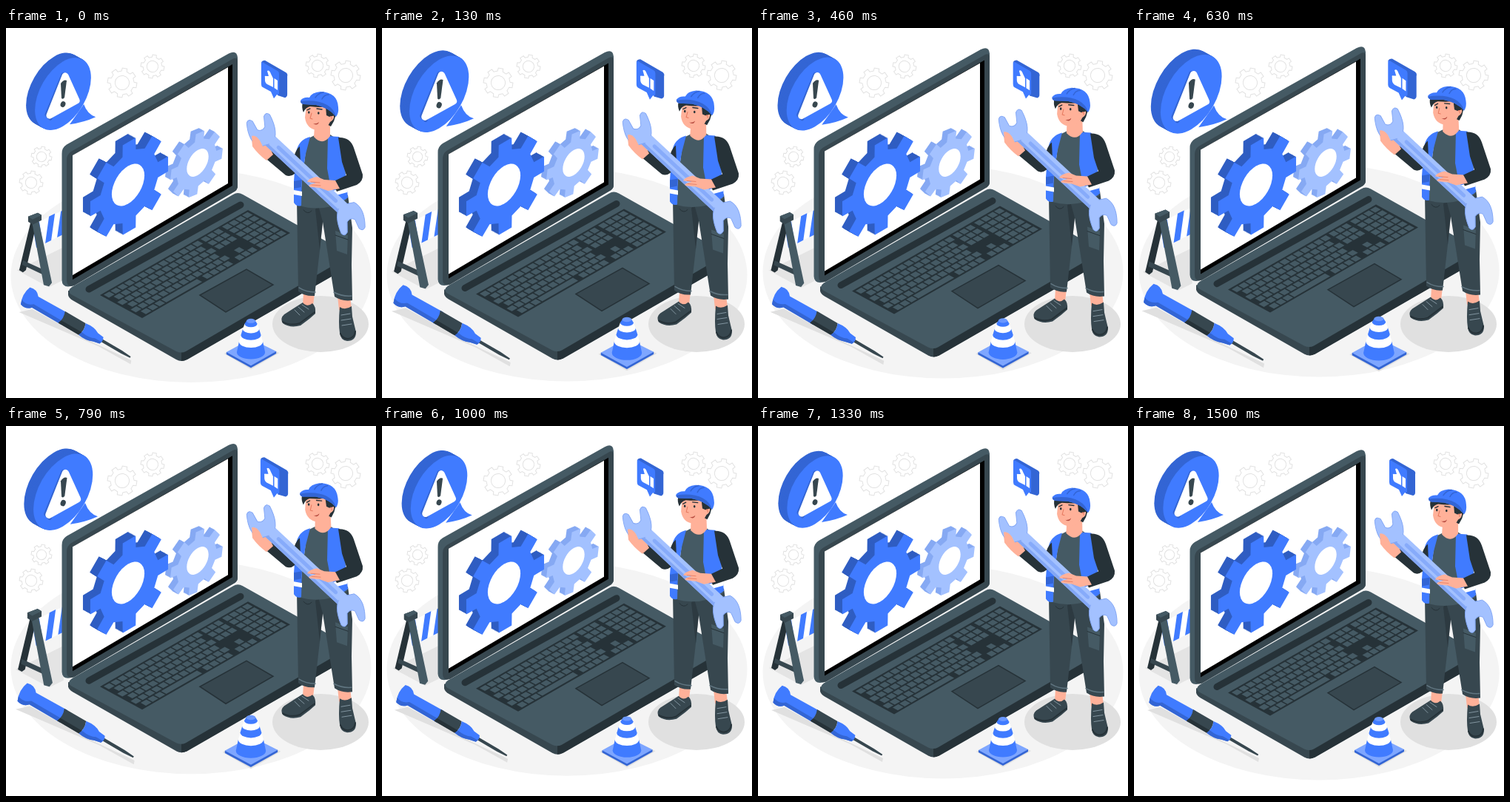
Animation of 500 by 500 pixels, one loop 1.54 s. Source, as an HTML page:

```html
<!DOCTYPE html>
<html lang="en">
<head>
<meta charset="utf-8">
<title>Laptop repair</title>
<style>
html, body { margin: 0; width: 100%; height: 100%; overflow: hidden; background: #fff; }
svg { display: block; width: 100%; height: 100%; }
.beat { transform-box: fill-box; transform-origin: center; }
.blue { fill: #407bff; }
.deep { fill: #3365d4; }
.pale { fill: #a3c1ff; }
.grey { fill: #455a64; }
.slate { fill: #37474f; }
.dark { fill: #263238; }
.skin { fill: #ffb199; }
.shade { fill: #e0e0e0; }
.white { fill: #fff; }
.line { fill: none; stroke-linecap: round; stroke-linejoin: round; }
</style>
</head>
<body>
<svg viewBox="0 0 500 500">
  <ellipse class="float" cx="250" cy="335" rx="243.500" ry="144" fill="#f4f4f4"/>
  <g id="outlines" fill="#fff" fill-rule="evenodd" stroke="#e2e2e2"/></g>
  <ellipse class="shade" cx="425" cy="400" rx="65" ry="38"/>

  <g class="beat" id="barrier">
    <path d="M15 327L76 297V341L58 350Z" fill="#e4e4e4"/>
    <path class="white" d="M34 267L78 246V278L40 298Z"/>
    <path class="blue" d="M36 266L45 262L50 293L41 297ZM58 255L66 251L61 287L53 291ZM74 248L80 245L77 279L69 283Z"/>
    <path class="dark" d="M34 260L42 261L27 327L23 330L18 327Z"/>
    <path class="slate" d="M23 314L52 327V334L22 320Z"/>
    <path class="grey" d="M35 262L44 260L62 344L58 349L51 347Z"/>
    <path class="slate" d="M30 255L43 250L48 253V260L36 266L30 262Z"/>
    <path class="grey" d="M30 255L43 250L48 253L36 259Z"/>
  </g>

  <g class="float">
    <path class="slate" d="M84 355V361Q85 365 90 368L230 448Q237 452 244 448L457 326Q463 322 463 315V303Z"/>
    <path class="dark" d="M237 438V450Q241 450 245 448L457 326Q463 322 463 315V306Z"/>
    <path class="grey" d="M88 360Q82 355 89 350L307 225Q313 221 320 225L459 303Q465 307 459 311L243 437Q237 440 230 437Z"/>
    <path class="line" d="M112 353L317 239" stroke="#263238" stroke-width="9"/>
    <g transform="matrix(200 -115 57 31 127 361)">
      <path class="dark" d="M0 0H1V1H0Z"/>
      <path id="keys" class="grey"/>
    </g>
    <path class="slate" d="M262 361L325 326L361 347L297 384Z" stroke="#263238" stroke-width="1.500"/>
    <path class="grey" d="M75.500 170Q75 162 82 157.500L301 34.500Q312 29 313 40V214Q313 219 307 222L92 348Q76 353 75.500 341Z"/>
    <path class="slate" d="M82 178Q82 171 88 167L306 42Q313 38 313 46V214Q313 219 307 222L92 348Q82 351 82 341Z"/>
    <path d="M90 172L306 49V213L90 340Z"/>
    <path class="white" d="M90 172L300 53V210L90 334Z"/>
  </g>
  <g id="screenGears"></g>

  <g class="beat">
    <g id="bubble"></g>
    <path class="blue" d="M86 130Q106 127 121 120Q110 117 105 103Z"/>
    <path class="deep" d="M77 63L55 117L60 122L80 66Z" stroke="#3365d4" stroke-width="5" stroke-linejoin="round"/>
    <path class="white" d="M80 65L59 118L95 98Z" stroke="#fff" stroke-width="9" stroke-linejoin="round"/>
    <path class="slate" d="M74 75Q78 69 82 71L79 94Q77 97 75 95Z"/>
    <ellipse class="slate" cx="77" cy="103" rx="3.300" ry="4" transform="rotate(20 77 103)"/>
  </g>

  <g class="beat">
    <path class="deep" d="M367 58L380 64V90Q380 93 377 94L367 91Z"/>
    <path d="M345 47Q346 44 350 44L378 60Q381 62 380 65L368 62Z" fill="#3365d4"/>
    <path class="blue" d="M345 48Q345 45 348 47L367 58Q369 59 369 62V88Q369 91 366 90L362 95L358 86L347 80Q345 79 345 76Z"/>
    <path class="white" d="M350 67Q349 64 352 65L355 65L353 58Q356 56 358 62L361 68V80L353 76Q350 74 350 70ZM362.500 68L367 71V84L362.500 81Z"/>
  </g>

  <g class="beat">
    <path class="shade" d="M18 384L36 380L120 426L169 449L168 454L125 430Z"/>
    <g transform="translate(33 366) rotate(30.300)">
      <path class="slate" d="M110 -2H142L156 -1V1L142 2H110Z"/>
      <path class="blue" d="M-8 -13Q2 -16 8 -8L54 -9V9L8 9Q2 16 -7 13Q-13 0 -8 -13Z"/>
      <path class="deep" d="M-9 7Q0 11 8 4L54 4V9L8 9Q2 16 -7 13Z"/>
      <path class="slate" d="M49 -9H81Q85 0 81 9H49Q53 0 49 -9Z"/>
      <path class="dark" d="M51 4H83L81 9H49Z"/>
      <path class="blue" d="M81 -9Q94 -11 102 -6L111 -5Q114 0 111 5L102 7Q92 11 81 9Q85 0 81 -9Z"/>
      <path class="deep" d="M83 4Q95 6 102 2L112 2L111 5L102 7Q92 11 81 9Z"/>
    </g>
  </g>

  <g class="beat">
    <path class="shade" d="M295 440L330 421L369 439L331 461Z"/>
    <path class="deep" d="M298 438L365 437V440L331 459L298 441Z"/>
    <path d="M298 438L331 420L365 437L331 456Z" fill="#7ea6ff"/>
    <g id="cone"></g>
  </g>

  <g class="float">
    <path class="skin" d="M402 358H417L415 375Q408 380 401 374ZM448 362H465L467 380Q458 386 450 381Z"/>
    <g class="slate">
      <path d="M401 371Q390 378 376 387Q370 392 374 399Q384 406 398 402L410 393L418 386Q419 376 414 372Q407 378 401 371Z"/>
      <path d="M451 377Q449 400 451 412Q452 422 461 423Q473 423 473 411L468 390L467 376Q458 382 451 377Z"/>
    </g>
    <path class="line" d="M374 397Q384 403 397 399L417 384M452 413Q455 420 462 420Q471 419 472 410" stroke="#263238" stroke-width="2"/>
    <path class="line" d="M390 381L397 388M395 377L403 384M400 374L409 380M454 402L467 400M453 395L466 393M453 388L465 386" stroke="#8295a0"/>
    <path class="slate" d="M393 232L395 356Q404 363 417 362L424 300L428 262L444 363Q454 370 468 368L467 320L468 270L462 226Z"/>
    <path class="dark" d="M424 300L428 262L422 240L418 245Z" opacity=".6"/>
    <path class="line" d="M396 351Q405 357 418 357M443 357Q454 363 467 362" stroke="#607580" stroke-width="1.500"/>
    <path class="grey" d="M445 274L462 280L461 306L447 301Z"/>
    <path class="line" d="M445 280L462 286M402 246Q408 253 413 247" stroke="#263238"/>

    <path class="grey" d="M407 150L417 145L438 144L456 156L461 232Q430 250 396 240Z"/>
    <path class="blue" d="M411 147Q395 151 392 168L389 207V236Q393 242 399 240L400 200L405 170ZM435 146L450 147Q459 156 457 180L462 229Q454 237 442 232L434 190Z"/>
    <path class="deep" d="M389 207L400 205L399 215L389 217Z"/>
    <path class="white" d="M389 219L400 221V227L389 225ZM441 220L461 215V222L443 227Z"/>
    <path class="dark" d="M397 160Q391 164 387 181L383 188L359 166Q352 171 353 178L378 199Q384 202 390 197L398 183Z"/>

    <g id="head">
      <path class="skin" d="M417 133L438 126L438 146Q428 160 416 147Z"/>
      <path class="dark" d="M404 100L444 104Q449 119 439 133L430 128Z"/>
      <path class="skin" d="M406 103L404 121Q406 136 420 138Q434 137 438 127Q444 124 443 118Q440 114 436 119L432 107Z"/>
      <path class="dark" d="M401 101Q399 107 402 114Q405 107 411 106Q427 108 432 106L433 118L437 120L445 118L446 108L424 99Z"/>
      <path class="line" d="M407 111L411 109M420 109L427 110" stroke="#263238" stroke-width="1.400"/>
      <path class="line" d="M413 115L411 122L414 123M438 120Q440 118 440 123" stroke="#e5785e"/>
      <path class="dark" d="M408 114a1.300 1.800 0 1 0 2.600 0a1.300 1.800 0 1 0 -2.600 0M421 115a1.300 1.800 0 1 0 2.600 0a1.300 1.800 0 1 0 -2.600 0"/>
      <path d="M415 129Q420 130 423 127Q421 133 415 129Z" fill="#b74c40"/>
      <path class="blue" d="M398 98Q402 93 410 94Q413 87 425 86Q448 87 449 107Q450 115 446 120Q437 108 419 104L402 103Q398 102 398 98Z"/>
      <path class="deep" d="M398 99Q420 96 434 104Q444 110 446 120Q437 108 419 104L402 103Q398 102 398 99Z"/>
      <path class="line" d="M418 94Q422 88 429 87M427 96Q430 90 436 90" stroke="#3365d4" stroke-width="1.500"/>
    </g>

    <path class="skin" d="M358 165Q353 154 346 151L339 141Q333 143 332 149L333 160Q341 171 352 179L361 171Z"/>
    <g transform="translate(347 143) rotate(43)">
      <path class="pale" d="M8 -9H152V9H8Z"/>
      <path d="M8 5H152V9H8Z" fill="#82a6f5"/>
      <g id="wrenchEnds"></g>
    </g>
    <path class="skin" d="M332 146Q337 144 343 152L348 162L342 164L333 156Z"/>
    <path class="dark" d="M449 148Q465 147 470 162L482 198Q483 207 474 212L447 221L441 208L460 199L454 181Z"/>
    <path class="skin" d="M445 206L430 205L420 201Q409 203 407 208L419 209L410 212Q408 215 414 215L424 216L435 220L451 217Z"/>
    <path class="line" d="M412 208L424 209M413 212L425 213" stroke="#e5785e" stroke-width=".800"/>
  </g>
</svg>
<script>
const LOOP = 1540;
const $ = id => document.getElementById(id);

const circle = r => `M${r} 0A${r} ${r} 0 1 0 ${-r} 0A${r} ${r} 0 1 0 ${r} 0Z`;

function gear(r, root, turn = 0) {
  const points = Array.from({ length: 32 }, (_, k) => {
    const a = ((k >> 2) + turn + [-.29, -.21, .21, .29][k % 4]) * Math.PI / 4;
    const q = k % 4 % 3 ? r : root;
    return `${(q * Math.cos(a)).toFixed(2)} ${(q * Math.sin(a)).toFixed(2)}`;
  });
  return `M${points.join('L')}Z`;
}

// A flat shape on the wall plane, with depth towards the upper left
function slab(d, x, y, depth, face, side) {
  let out = '';
  for (let i = depth; i >= 0; i--)
    out += `<path d="${d}" fill="${i ? side : face}" transform="matrix(.866 -.5 0 1 ${x - i} ${y - i * .55})"/>`;
  return out;
}

function hole(x, y, r) {
  return `<path class="white" d="${circle(r)}" transform="matrix(.866 -.5 0 1 ${x} ${y})"/>`;
}

$('outlines').innerHTML = [
  [157, 74, 20], [198, 52, 16], [421, 51, 16], [459, 64, 20], [48, 174, 14], [34, 209, 16]
].map(([x, y, r]) =>
  `<path d="${gear(r, r * .8)}${circle(r * .48)}" transform="translate(${x} ${y}) rotate(10)"/>`).join('');

$('screenGears').innerHTML =
  slab(gear(41, 31, .18), 257.5, 184, 7, '#a3c1ff', '#86a9f3') + hole(259, 182, 17) +
  slab(gear(61.5, 46), 166.5, 214, 10, '#407bff', '#2f5dc2') + hole(165, 212, 25.5);

$('bubble').innerHTML = slab(circle(43.5), 77, 89, 12, '#407bff', '#3365d4');

function keyboard() {
  let d = '';
  const key = (x, y, w, h) => d += `M${x + .004} ${y + .018}h${w - .008}v${h - .036}h${.008 - w}Z`;
  const h = .96 / 6;
  for (let row = 0; row < 6; row++) {
    const y = .02 + row * h, shift = row % 2 * .022;
    for (let x = .01 + shift; x < .61; x += .046)
      if (row < 5 || x < .15 || x > .42) key(x, y, .046, h);
    if (row == 5) key(.17, y, .25, h);
    for (let i = 0; i < 3; i++)
      if (row < 3 || row == 5 || row == 4 && i == 1) key(.665 + i * .043, y, .043, h);
    for (let i = 0; i < 4; i++) key(.81 + i * .045, y, .045, h);
  }
  return d;
}
$('keys').setAttribute('d', keyboard());

// Cone bands from the bottom up: lower edge, radius, upper edge, radius, colour
$('cone').innerHTML = [
  [438, 19, 424, 16, '#407bff'], [424, 16, 415, 13.5, '#fff'], [415, 13.5, 407, 11, '#407bff'],
  [407, 11, 400, 8.5, '#fff'], [400, 8.5, 396, 6, '#407bff']
].map(([y, r, top, q, fill]) =>
  `<path fill="${fill}" d="M${331 - r} ${y}A${r} ${r * .5} 0 0 0 ${331 + r} ${y}L${331 + q} ${top}H${331 - q}Z"/>`
).join('') + '<ellipse cx="331" cy="396" rx="6" ry="3" fill="#6b98ff"/>';

const jaw = 'M17 -10C8 -21 -8 -21 -24 -18Q-30 -14 -24 -9L-9 -6Q-3 0 -8 6L-22 9Q-28 14 -22 18C-8 21 8 21 17 10Z';
$('wrenchEnds').innerHTML = [[0, 30], [161, 215]].map(([x, turn]) =>
  `<path class="pale" d="${jaw}" stroke="#82a6f5" transform="translate(${x}) rotate(${turn}) scale(.92)"/>`
).join('') + '<path class="pale" d="M8 -8H153V4H8Z"/><path class="line" d="M28 -1H134" stroke="#87abfa" stroke-width="5"/>';

const floating = document.querySelectorAll('.float');
const beating = document.querySelectorAll('.beat');

// Two linear pulses, then a rest
function pulse(p) {
  const stops = [0, .14, .28, .42, .7];
  for (let i = 0; i < 4; i++) {
    if (p < stops[i + 1]) {
      const k = (p - stops[i]) / (stops[i + 1] - stops[i]);
      return i % 2 ? 1 - k : k;
    }
  }
  return 0;
}

function draw() {
  const t = performance.now();
  const lift = 1 - Math.abs(1 - t % LOOP / LOOP * 2);
  const scale = 1 + .1 * pulse((t + 10) % LOOP / LOOP);
  floating.forEach(el => el.setAttribute('transform', `translate(0 ${-9 * lift})`));
  beating.forEach(el => el.style.transform = `scale(${scale})`);
  $('head').setAttribute('transform', `rotate(${-3 * lift} 425 118)`);
  requestAnimationFrame(draw);
}
draw();
</script>
</body>
</html>
```
